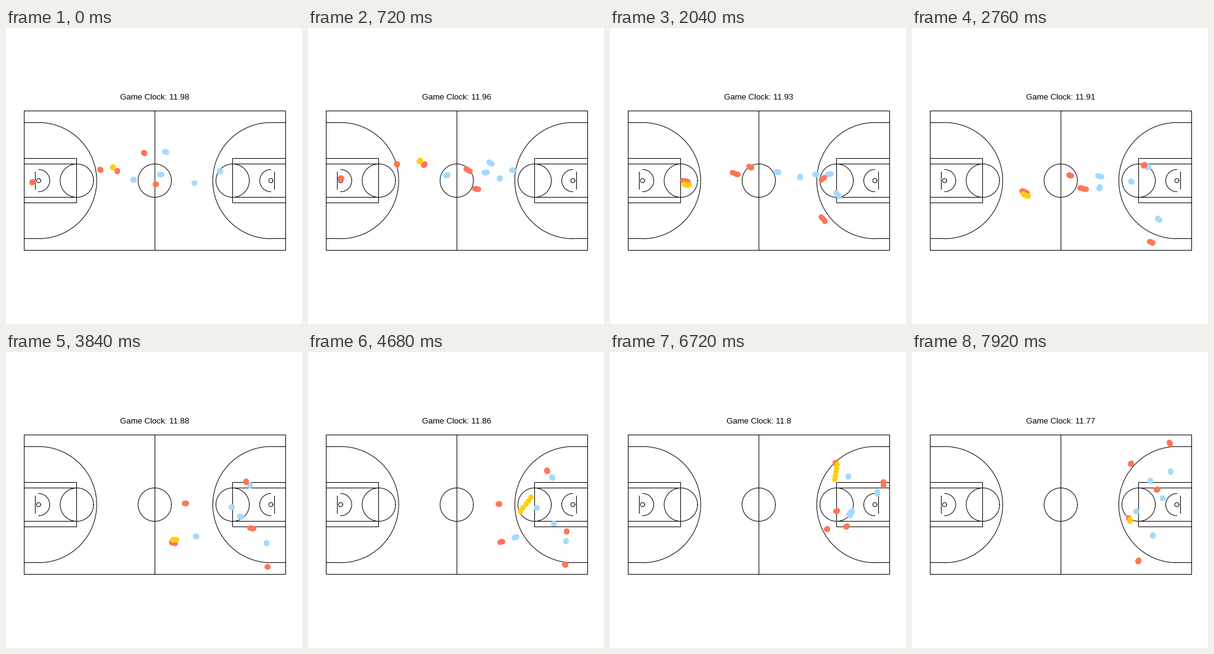
A matplotlib script that plays this animation: 480 px wide and 480 px high, repeating every 8 s.

```python
import numpy as np
import matplotlib.pyplot as plt
from matplotlib.animation import FuncAnimation

SIZE, DPI = 480, 80
PX = 72 / DPI                      # points per pixel
STEPS, HOLD, TICK = 67, 3, 40      # each step is held for three ticks
TICKS = 200
WAKE = np.linspace(-0.4, 0.4, 5)   # five samples are drawn per step
BEATS = np.array([0, 11, 23, 32, 40, 47, 56, 66.0])

RED, BLUE, GOLD = "#ff7556", "#a4daff", "#ffcf0d"
FOOT = 4.51
LEFT, RIGHT, TOP, BOTTOM = 29.2, 453.2, 134.5, 360.5
MID_X, MID_Y = 241.2, 247.5
RIM = np.array([RIGHT - 5.25 * FOOT, MID_Y])

fig = plt.figure(figsize=(SIZE / DPI, SIZE / DPI), dpi=DPI, facecolor="white")
ax = fig.add_axes([0, 0, 1, 1])
ax.set(xlim=(0, SIZE), ylim=(SIZE, 0))
ax.axis("off")


def curve(xs, ys):
    ax.plot(xs, ys, color="black", lw=PX, zorder=1, snap=False,
            solid_capstyle="projecting", solid_joinstyle="miter")


def line(xs, ys):
    """Straight strokes, centred on whole pixels so they stay crisp."""
    curve(np.floor(xs) + 0.5, np.floor(ys) + 0.5)


def box(x0, y0, x1, y1):
    line([x0, x1, x1, x0, x0], [y0, y0, y1, y1, y0])


def arc(x, r, start=0, stop=360):
    a = np.radians(np.linspace(start, stop, 181))
    curve(x + r * np.cos(a), MID_Y + r * np.sin(a))


def half_court(base, side):
    """Markings of one end; side is 1 for the left end, -1 for the right."""
    foul = base + side * 19 * FOOT
    rim = base + side * 5.25 * FOOT
    board = base + side * 4 * FOOT
    turn = 0 if side > 0 else 180
    for half in (8, 6):
        box(base, MID_Y - half * FOOT, foul, MID_Y + half * FOOT)
    arc(foul, 6 * FOOT)
    arc(rim, 0.75 * FOOT)
    arc(rim, 4 * FOOT, turn - 90, turn + 90)
    line([board] * 2, [MID_Y - 3 * FOOT, MID_Y + 3 * FOOT])
    reach = 94.2
    arc(rim, reach, turn - 90, turn + 90)
    for y in (MID_Y - reach, MID_Y + reach):
        line([base, rim], [y, y])


def ramp(t, start, stop):
    return np.clip((t - start) / (stop - start), 0, 1)[:, None]


def mix(a, b, u):
    return a + (b - a) * u


def route(*points):
    """Smooth run through one point per beat."""
    p = np.array(points, float)
    v = np.gradient(p, BEATS, axis=0)
    v[[0, -1]] *= 0.5

    def at(t):
        i = np.clip(np.searchsorted(BEATS, t, side="right") - 1, 0, len(p) - 2)
        h = (BEATS[i + 1] - BEATS[i])[:, None]
        u = (t - BEATS[i])[:, None] / h
        s = u * u * (3 - 2 * u)
        return (mix(p[i], p[i + 1], s) + h * u * (1 - u) ** 2 * v[i]
                - h * u * u * (1 - u) * v[i + 1])

    return at


def marker(start, meet, man, sag, drift, lean=(0, 0)):
    """Defender who runs in, then stays between his man and the rim."""
    start, meet, lean = map(np.array, (start, meet, lean))

    def at(t):
        run = mix(start, meet, t[:, None] / BEATS[1])
        depth = sag + drift * (t[:, None] / BEATS[-1]) ** 2
        return mix(run, mix(man(t), RIM, depth) + lean, ramp(t, BEATS[1], BEATS[2]))

    return at


point_guard = route((42, 249.5), (73, 240.5), (182, 265), (271, 309),
                    (318, 306), (349, 293), (351.5, 287), (351, 269))
sprinter = route((152.5, 229.5), (150.5, 217.5), (277, 260), (398.5, 285.5),
                 (420, 291), (419, 296), (383, 282.5), (366.5, 338.5))
passer = route((180, 231.5), (200.5, 215.5), (256, 238.5), (290.5, 245),
               (312, 246), (330, 246.5), (367, 257.5), (397, 222.5))
corner = route((223, 201.5), (298, 262), (387.5, 347), (424, 348),
               (416, 342), (419.5, 310), (443, 213), (417.5, 147.5))
wing = route((242, 252.5), (305.5, 263), (376, 222), (389, 210),
             (386, 190), (371.5, 175), (365, 179.5), (354.5, 180.5))

helper_a = route((206, 245.5), (246, 233.5), (304, 240), (380, 266.5),
                 (400, 279), (408.5, 284.5), (388, 264), (363, 258))
helper_b = route((347, 231.5), (317.5, 231.5), (303.5, 258.5), (307.5, 298.5),
                 (340, 298), (361.5, 267.5), (391, 259.5), (390, 297))
wing_marker = marker((249, 237), (320, 231.5), wing, 0.07, 0.35)
corner_marker = marker((257, 199.5), (327, 234), corner, 0.36, 0.1, (-4, 0))
passer_marker = marker((305, 251), (315, 237.5), passer, 0.62, -0.25, (-3, 5))


def ball(t):
    """Two passes out, one pass back; the point guard dribbles in between."""
    bounce = np.column_stack([np.full_like(t, 2), 6 * np.cos(t - BEATS[2])])
    dribble = point_guard(t) + bounce
    spot = passer(t) + (-7, -6)
    spot = mix(spot, dribble, ramp(t, 7, 13))
    spot = mix(spot, wing(t) + (3, -1), ramp(t, 37, 41))
    return mix(spot, dribble, ramp(t, 55.5, 59))


box(LEFT, TOP, RIGHT, BOTTOM)
line([MID_X] * 2, [TOP, BOTTOM])
arc(MID_X, 6 * FOOT)
half_court(LEFT, 1)
half_court(RIGHT, -1)

teams = [
    (BLUE, [helper_a, helper_b, wing_marker, corner_marker, passer_marker]),
    (RED, [point_guard, sprinter, passer, corner, wing]),
    (GOLD, [ball]),
]
dots = [ax.scatter([], [], s=(8.8 * PX) ** 2, color=color, linewidths=0, zorder=3 + i)
        for i, (color, _) in enumerate(teams)]
title = ax.text(MID_X, 116, "", ha="center", va="baseline", color="black",
                family="Liberation Sans", size=13.2 * PX)


def update(tick):
    step = min(tick // HOLD, STEPS - 1)
    times = np.maximum(step + WAKE, 0)
    for art, (_, players) in zip(dots, teams):
        art.set_offsets(np.vstack([at(times) for at in players]))
    clock = f"{11.9815 - 0.0032 * step:.2f}".rstrip("0")
    title.set_text(f"Game Clock: {clock}")
    return [*dots, title]


anim = FuncAnimation(fig, update, frames=TICKS, interval=TICK,
                     init_func=lambda: update(0), repeat=True, repeat_delay=0)
plt.show()
```
